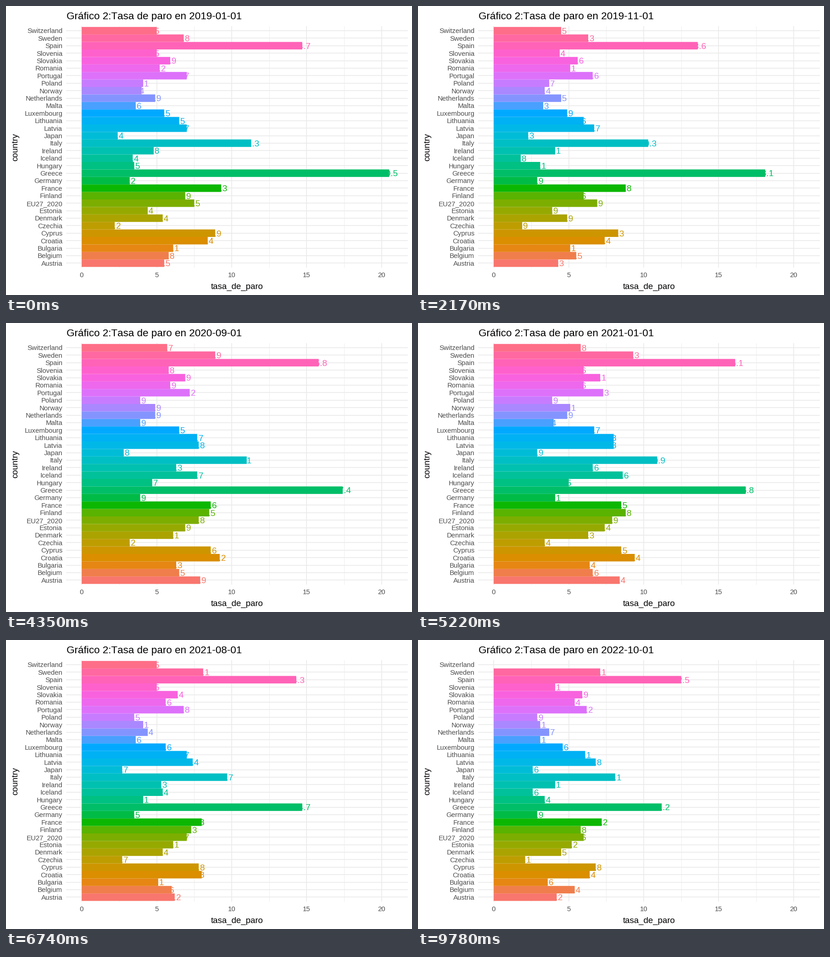
A matplotlib script for the animation above (10000 ms loop, 885 px wide and 632 px high).

```python
import numpy as np
import matplotlib.pyplot as plt
from matplotlib.animation import FuncAnimation
from matplotlib.patches import Rectangle

plt.rcParams["font.family"] = "Liberation Sans"
plt.rcParams["text.kerning_factor"] = 6  # plain advances, no pair kerning

W, H, DPI = 885, 632, 100
PT = 72 / DPI  # points per pixel
LOOP, STEP, MONTHS, PEAK = 10000, 50, 46, 24

LEFT, RIGHT, TOP, BOTTOM = 131.2, 875.7, 44.2, 572.2
ROW, FIRST_ROW = 16.4, 54
MAX_RATE = 20.7
X_SCALE = (RIGHT - LEFT) / 1.1 / MAX_RATE
X_ZERO = LEFT + (RIGHT - LEFT) / 22

BASE = 56 / 3  # base font size in pixels
GRID, TICK_INK = "#EBEBEB", "#4D4D4D"

# Unemployment rate at the start, in January 2021 and at the end.
COUNTRIES = {
    "Austria": (5.5, 8.4, 4.2),
    "Belgium": (5.8, 6.6, 5.4),
    "Bulgaria": (6.1, 6.4, 3.6),
    "Croatia": (8.4, 9.4, 6.4),
    "Cyprus": (8.9, 8.5, 6.8),
    "Czechia": (2.2, 3.4, 2.1),
    "Denmark": (5.4, 6.3, 4.5),
    "Estonia": (4.4, 7.4, 5.2),
    "EU27_2020": (7.5, 7.9, 6),
    "Finland": (6.9, 8.8, 5.8),
    "France": (9.3, 8.5, 7.2),
    "Germany": (3.2, 4.1, 2.9),
    "Greece": (20.5, 16.8, 11.2),
    "Hungary": (3.5, 5, 3.4),
    "Iceland": (3.4, 8.6, 2.6),
    "Ireland": (4.8, 6.6, 4.1),
    "Italy": (11.3, 10.9, 8.1),
    "Japan": (2.4, 2.9, 2.6),
    "Latvia": (7, 8, 6.8),
    "Lithuania": (6.5, 8, 6.1),
    "Luxembourg": (5.5, 6.7, 4.6),
    "Malta": (3.6, 4, 3.1),
    "Netherlands": (4.9, 4.9, 3.7),
    "Norway": (4, 5.1, 3.1),
    "Poland": (4.1, 3.9, 2.9),
    "Portugal": (7, 7.3, 6.2),
    "Romania": (5.2, 6, 5.4),
    "Slovakia": (5.9, 7.1, 5.9),
    "Slovenia": (5, 6, 4.1),
    "Spain": (14.7, 16.1, 12.5),
    "Sweden": (6.8, 9.3, 7.1),
    "Switzerland": (5, 5.8, 4.2),
}

# Shared course of the pandemic: a dip, a fast rise and a slow recovery.
months = np.arange(MONTHS)
pulse = np.interp(months, [0, 10, 16, PEAK, 31, 38, 45],
                  [0, -0.25, 0.65, 1, 0.45, 0.1, 0])


def course(start, peak, end):
    trend = np.linspace(start, end, MONTHS)
    return np.round(trend + (peak - trend[PEAK]) * pulse, 1)


rates = {name: course(*points) for name, points in COUNTRIES.items()}
rates["Switzerland"][-1] = np.nan  # not yet reported


def hue(i, n, c=100, lum=65):
    """Evenly spaced HCL hue as sRGB."""
    h = np.radians(15 + 360 * i / n)
    y = ((lum + 16) / 116) ** 3
    u = c * np.cos(h) / (13 * lum) + 0.19784
    v = c * np.sin(h) / (13 * lum) + 0.46834
    x = 9 * y * u / (4 * v)
    z = -x / 3 - 5 * y + 3 * y / v
    lin = np.array([[3.240479, -1.53715, -0.498535],
                    [-0.969256, 1.875992, 0.041556],
                    [0.055648, -0.204043, 1.057311]]) @ [x, y, z]
    lin = np.clip(lin, 0, 1)
    return tuple(np.where(lin > 0.00304,
                          1.055 * lin ** (1 / 2.4) - 0.055, 12.92 * lin))


def x_pos(rate):
    return X_ZERO + X_SCALE * rate


fig = plt.figure(figsize=(W / DPI, H / DPI), dpi=DPI, facecolor="white")
ax = fig.add_axes([0, 0, 1, 1])
ax.set(xlim=(0, W), ylim=(H, 0))
ax.axis("off")


def write(x, y, s, size, color="black", va="baseline", **kw):
    return ax.text(x, y, s, fontsize=size * PT, color=color, va=va, **kw)


def rule(xs, ys, width):
    ax.plot(xs, ys, color=GRID, lw=width * PT, zorder=1,
            solid_capstyle="butt")


for rate in np.arange(2.5, 20, 5):
    rule([x_pos(rate)] * 2, [TOP, BOTTOM], 0.9)
for rate in range(0, 21, 5):
    rule([x_pos(rate)] * 2, [TOP, BOTTOM], 1.8)
    write(x_pos(rate), 593, str(rate), 0.8 * BASE, TICK_INK, ha="center")

bars, labels = [], []
for i, name in enumerate(rates):
    y = FIRST_ROW + ROW * (len(rates) - 1 - i)
    color = hue(i, len(rates))
    rule([LEFT, RIGHT], [y, y], 1.8)
    write(123, y + 5.4, name, 0.8 * BASE, TICK_INK, ha="right")
    # Values sit behind the bars, so only their right part shows.
    labels.append(write(0, y + 6.8, "", 18.97, color, ha="center", zorder=2))
    bar = Rectangle((X_ZERO, y - ROW / 2), 0, ROW, fc=color, lw=0,
                    snap=False, zorder=3)
    bars.append(ax.add_patch(bar))

write((LEFT + RIGHT) / 2, 618.7, "tasa_de_paro", BASE, ha="center")
write(29.5, (TOP + BOTTOM) / 2, "country", BASE, va="center", ha="right",
      rotation=90)
title = write(131.5, 28.5, "", 1.2 * BASE)


def update(frame):
    # The month in force when this short step ends.
    month = int(np.ceil((frame + 1) * STEP * MONTHS / LOOP)) - 1
    title.set_text("Gráfico 2:Tasa de paro en "
                   f"{2019 + month // 12}-{month % 12 + 1:02d}-01")
    for series, bar, label in zip(rates.values(), bars, labels):
        rate = series[month]
        known = not np.isnan(rate)
        bar.set_width(X_SCALE * rate if known else 0)
        label.set_text(f"{rate:g}" if known else "")
        label.set_x(x_pos(rate) if known else 0)
    return [title, *bars, *labels]


anim = FuncAnimation(fig, update, frames=LOOP // STEP, interval=STEP,
                     repeat=True, repeat_delay=0)
plt.show()
```
